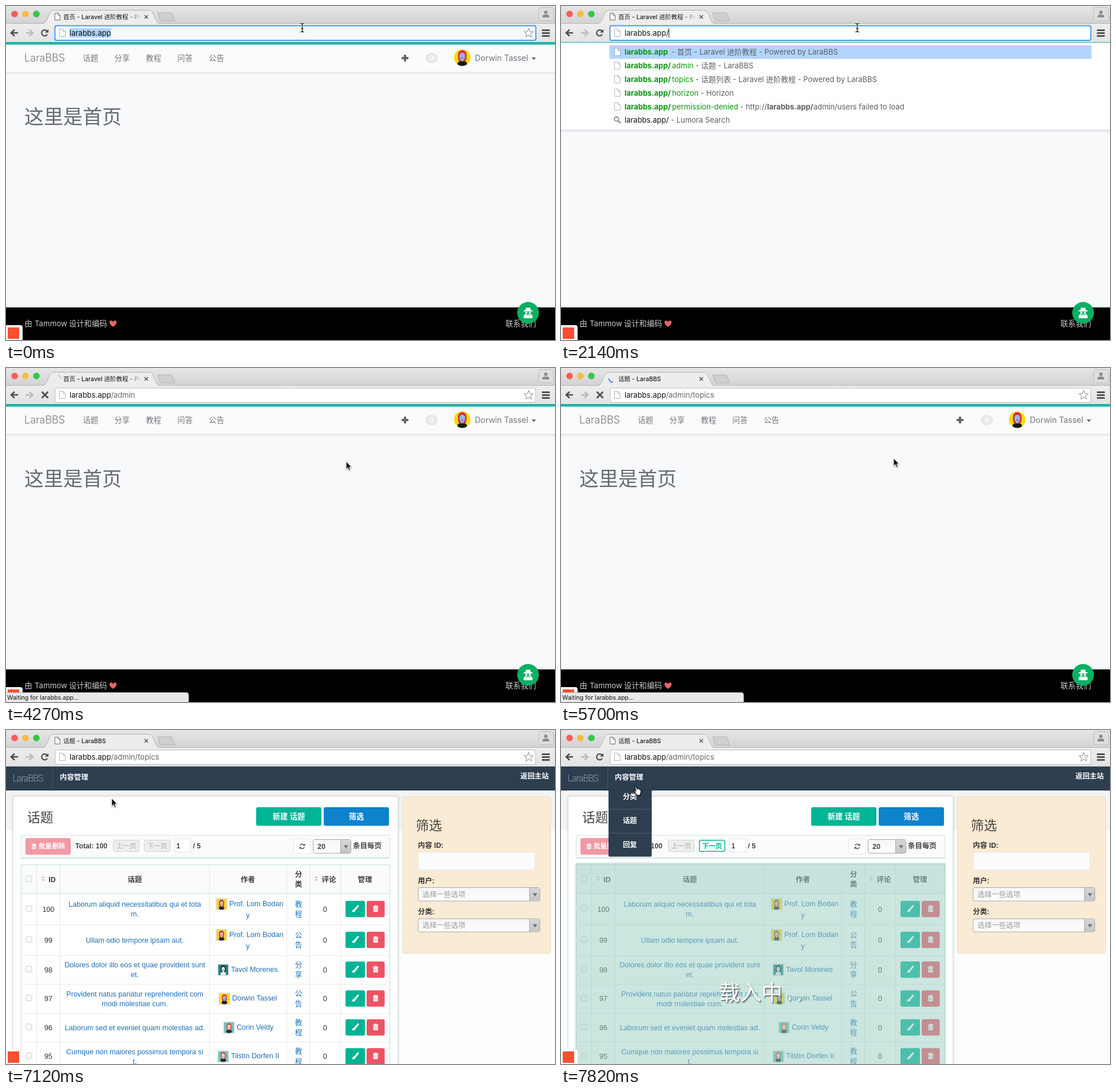
An HTML page with a canvas for the animation above (8 s loop, 959x584 px).

```html
<!DOCTYPE html>
<html lang="zh-CN">
<head>
<meta charset="utf-8">
<title>LaraBBS</title>
<style>
html, body { margin: 0; width: 100%; height: 100%; overflow: hidden; background: #f8f9fb; }
canvas { display: block; }
</style>
</head>
<body>
<canvas id="stage" width="959" height="584"></canvas>
<script>
const c = document.getElementById('stage').getContext('2d');
const LOOP = 8000, STEP = LOOP / 45;
const UI = 'Inter, "Noto Sans CJK SC", "Noto Sans CJK", sans-serif';
const ARIAL = '"Liberation Sans", "Noto Sans CJK SC", "Noto Sans CJK", sans-serif';
const TEAL = '#00b495', NAVY = '#2d3e50', LINK = '#1c6fb8', RED = '#ee5263';

function box(x, y, w, h, fill, r = 0, stroke, lw = 1) {
  c.beginPath();
  const o = stroke ? lw / 2 : 0;
  c.roundRect(x + o, y + o, w - 2 * o, h - 2 * o, r);
  if (fill) { c.fillStyle = fill; c.fill(); }
  if (stroke) { c.strokeStyle = stroke; c.lineWidth = lw; c.stroke(); }
}

function poly(pts, fill, stroke, lw = 1, open) {
  c.beginPath();
  for (let i = 0; i < pts.length; i += 2) c.lineTo(pts[i], pts[i + 1]);
  if (!open) c.closePath();
  if (fill) { c.fillStyle = fill; c.fill(); }
  if (stroke) { c.strokeStyle = stroke; c.lineWidth = lw; c.stroke(); }
}

const line = (x1, y1, x2, y2, color, lw = 1) => poly([x1, y1, x2, y2], null, color, lw, true);

function dot(x, y, r, fill) {
  c.beginPath();
  c.arc(x, y, r, 0, 7);
  c.fillStyle = fill;
  c.fill();
}

function arc(x, y, r, from, to, color, lw) {
  c.beginPath();
  c.arc(x, y, r, from, to);
  c.strokeStyle = color;
  c.lineWidth = lw;
  c.stroke();
}

// Text centred vertically on cy; returns its right edge.
function text(s, x, cy, size, color, { font = UI, weight = 400, align = 'left' } = {}) {
  c.font = `${weight} ${size}px ${font}`;
  c.textAlign = align;
  c.fillStyle = color;
  c.fillText(s, x, cy + size * 0.36);
  return x + c.measureText(s).width;
}

function grad(y1, y2, a, b) {
  const g = c.createLinearGradient(0, y1, 0, y2);
  g.addColorStop(0, a);
  g.addColorStop(1, b);
  return g;
}

function docIcon(x, y, w, h, color) {
  const f = w * 0.4;
  poly([x, y, x + w - f, y, x + w, y + f, x + w, y + h, x, y + h], '#fff', color);
  poly([x + w - f, y, x + w - f, y + f, x + w, y + f], null, color, 1, true);
}

function avatar(x, y, w, h, [bg, hair, face, body]) {
  c.save();
  c.translate(x, y);
  c.scale(w / 20, h / 20);
  box(0, 0, 20, 20, bg);
  box(5, 1.5, 10, 14, hair, 5);
  box(6.8, 4.5, 6.4, 8.5, face, 3);
  box(8.5, 12, 3, 3.5, face);
  box(4.5, 14.5, 11, 6, body, 3);
  box(9, 10, 2, 1, hair);
  c.restore();
}

const LADY = ['#f7dc0a', '#e2263c', '#8fb8e8', '#161616'];
const LADY2 = ['#fbd21b', '#8c3b5e', '#f4b7a0', '#2a2740'];
const MAID = ['#14858a', '#17292f', '#f6ddd2', '#e9eef0'];
const CAPPED = ['#69c3bb', '#e0453b', '#f3d5c5', '#222b33'];

function trash(x, y) {
  box(x - 4, y - 3, 8, 8.5, '#fff', 1);
  box(x - 5, y - 4.5, 10, 1.3, '#fff');
  box(x - 2, y - 6, 4, 1.5, '#fff');
  for (const d of [-2, 0, 2]) line(x + d, y - 1.5, x + d, y + 4, 'rgba(230,90,110,.7)', 0.8);
}

function brush(x, y) {
  c.lineCap = 'round';
  line(x + 5, y - 5, x, y + 1, '#fff', 3);
  c.lineCap = 'butt';
  poly([x - 1, y, x + 1, y + 3, x - 2, y + 6, x - 6, y + 5, x - 4, y + 2], '#fff');
}

function reload(x, y, r, color, lw) {
  arc(x, y, r, 0.5, 5.6, color, lw);
  poly([x + r + 1.5, y - r - 1, x + r + 1.5, y - 0.5, x + 0.5, y - 0.5], color);
}

// Browser frame

const HOME_TITLE = '首页 - Laravel 进阶教程 - Powered by LaraBBS';

function tabStrip(n) {
  box(0, 0, 959, 31, grad(0, 31, '#e6e6e6', '#d2d2d2'));
  [['#fc5b57', 15], ['#fdbb3d', 34], ['#34c648', 53]].forEach(([f, x]) => dot(x, 14, 5.8, f));
  poly([265, 12, 289, 12, 295, 26, 272, 26, 269, 24], '#cfcfcf', '#b2b2b2');
  box(930, 2, 27, 24, '#dedede', 3, '#bdbdbd');
  dot(943, 11, 3, '#8b8b8b');
  box(937, 15, 12, 5, '#8b8b8b', [4, 4, 0, 0]);

  box(0, 31, 959, 33, grad(31, 64, '#ededed', '#e3e3e3'));
  line(0, 30.5, 959, 30.5, '#b4b4b4');
  c.beginPath();
  c.moveTo(65, 31);
  c.bezierCurveTo(74, 29, 74, 7.5, 82, 7.5);
  c.lineTo(251, 7.5);
  c.bezierCurveTo(259, 7.5, 259, 29, 268, 31);
  c.fillStyle = '#ededed';
  c.fill();
  c.strokeStyle = '#b4b4b4';
  c.lineWidth = 1;
  c.stroke();

  if (n >= 17 && n < 32) {
    const a = -1.5 - (n - 17) * 0.9;
    arc(90, 19, 6, a, a + 1.5, '#b9c1cf', 1.6);
  } else if (n === 32 || n === 33) {
    const a = 1.4 + (n - 32) * 1.1;
    arc(90, 18.5, 6.2, a, a + 1.8, '#3c82e0', 2);
  } else docIcon(85.5, 12.5, 9, 12, '#6b6b6b');

  c.save();
  c.beginPath();
  c.rect(98, 8, 138, 22);
  c.clip();
  text(n < 32 ? HOME_TITLE : '话题 - LaraBBS', 100, 19, 10.6, '#1d1d1d', { weight: 500 });
  const fade = c.createLinearGradient(212, 0, 236, 0);
  fade.addColorStop(0, 'rgba(237,237,237,0)');
  fade.addColorStop(1, '#ededed');
  c.fillStyle = fade;
  c.fillRect(212, 10, 24, 18);
  c.restore();
  line(242, 16, 248, 22, '#555', 1.5);
  line(248, 16, 242, 22, '#555', 1.5);
}

function arrowIcon(x, dir, color) {
  line(x - 6 * dir, 47, x + 5 * dir, 47, color, 2.6);
  poly([x, 41.5, x + 6 * dir, 47, x, 52.5], null, color, 2.6, true);
}

function star(x, y) {
  const pts = [];
  for (let i = 0; i < 10; i++) {
    const r = i % 2 ? 3.7 : 8.2, a = i * Math.PI / 5 - Math.PI / 2;
    pts.push(x + r * Math.cos(a), y + r * Math.sin(a));
  }
  poly(pts, '#fff', '#9a9a9a', 1.1);
}

function toolbar(n) {
  const focus = n < 17, loading = n >= 17 && n < 34;
  arrowIcon(15, -1, '#4d4d4d');
  arrowIcon(41, 1, '#bcbcbc');
  if (loading) {
    line(62.5, 41.5, 73.5, 52.5, '#4d4d4d', 2.8);
    line(73.5, 41.5, 62.5, 52.5, '#4d4d4d', 2.8);
  } else reload(67.5, 47, 5.2, '#4d4d4d', 2.3);
  for (const y of [41, 46, 51]) box(936, y, 14, 2.8, '#454545', 1);

  if (focus) box(84.5, 33.5, 842, 27.5, n < 3 ? '#f7f8fb' : '#fff', 3, '#4c9be8', 2);
  else box(85.5, 34.5, 840, 26, '#fff', 2, '#bcbcbc');
  docIcon(93.5, 40.5, 10, 13, '#b5b5b5');
  if (n < 6 || n >= 17) star(913, 47.5);
  address(n);
  line(0, 63.5, 959, 63.5, '#b9b9b9');
}

function address(n) {
  const host = 'larabbs.app', x = 111, size = 13;
  c.font = `${size}px ${UI}`;
  const width = s => c.measureText(s).width;
  if (n >= 17) {
    const end = text(host, x, 47, size, '#111');
    text(n < 32 ? '/admin' : '/admin/topics', end, 47, size, '#666');
    return;
  }
  const typed = n < 10 ? host : host + '/' + 'admin'.slice(0, n < 14 ? 0 : (n - 14) * 2 + 1);
  const full = n < 14 ? typed : host + '/admin';
  const from = n < 3 ? 0 : width(typed), to = width(full);
  if (to - from > 1) box(x + from, 39, to - from, 16, '#add2fb');
  text(full, x, 47, size, '#111');
  if (n >= 3) line(x + from + 0.5, 39, x + from + 0.5, 55, '#111');
}

const HITS = [
  ['larabbs.app', '', 0, '首页 - Laravel 进阶教程 - Powered by LaraBBS', 193],
  ['larabbs.app/', 'admin', 194, '话题 - LaraBBS', 235],
  ['larabbs.app/', 'topics', 194, '话题列表 - Laravel 进阶教程 - Powered by LaraBBS', 235],
  ['larabbs.app/', 'horizon', 194, 'Horizon', 244],
  ['larabbs.app/', 'permission-denied', 194, 'http://', 313],
];

function suggestions(n) {
  const hits = n < 10 ? HITS.slice(0, 1) : n < 14 ? HITS : HITS.slice(1);
  const count = hits.length + (n < 10 ? 0 : 1), h = count * 23.8 + 9.5;
  box(0, 64, 959, h, '#fff');
  box(0, 64 + h, 959, 5, grad(64 + h, 69 + h, '#d9dcdf', 'rgba(235,238,241,.3)'));
  box(84.5, 68.5, 842, 24, '#b2d5fe');
  const grey = '#5d5f63', green = '#0a960f';
  hits.forEach(([bold, rest, rx, desc, dx], i) => {
    const y = 80.7 + i * 23.8;
    docIcon(93.5, y - 7, 10, 13, i ? '#b5b5b5' : '#8fa9c8');
    text(bold, 111, y, 13, green, { weight: 700 });
    if (rest) text(rest, rx, y, 13, green);
    let end = text('- ' + desc, dx, y, 13, grey);
    if (desc === 'http://') {
      end = text('larabbs.app/', end, y, 13, grey, { weight: 700 });
      text('admin/users failed to load', end, y, 13, grey);
    }
  });
  if (n >= 10) {
    const y = 80.7 + hits.length * 23.8;
    arc(97, y - 2, 3.7, 0, 7, '#8a8a8a', 1.8);
    line(99.5, y + 1, 104, y + 5, '#8a8a8a', 2.4);
    text(n < 14 ? 'larabbs.app/' : 'larabbs.app/admin', 111, y, 13, '#111');
    text('- Lumora Search', n < 14 ? 192 : 230, y, 13, grey);
  }
}

// Pages

function homePage() {
  const grey = '#74777a';
  box(0, 64, 959, 520, '#f8f9fb');
  box(0, 67, 959, 48, '#fafbfc');
  box(0, 63, 959, 4.5, '#18b3a7');
  box(0, 115, 959, 5, grad(115, 120, '#e2e4e6', '#f5f6f8'));
  text('LaraBBS', 32, 91, 18, grey, { weight: 300 });
  ['话题', '分享', '教程', '问答', '公告'].forEach((s, i) => text(s, 134.3 + i * 55, 91, 13.4, grey));
  box(691, 89, 12, 4, '#666', 1);
  box(695, 85, 4, 12, '#666', 1);
  box(733, 82, 21.5, 18, '#e7e8e9', 9);
  text('0', 743.7, 91, 11.5, '#fff', { weight: 700, align: 'center' });
  c.save();
  c.beginPath();
  c.arc(797, 90.3, 14.4, 0, 7);
  c.clip();
  avatar(782, 75, 30, 30, LADY);
  c.restore();
  text('Dorwin Tassel', 819, 91, 14, grey);
  poly([918, 90, 926, 90, 922, 94.3], '#666');
  text('这里是首页', 32, 194, 34, '#636b6f', { weight: 300 });

  box(0, 527, 959, 57, '#000');
  const pale = '#c9c9c9';
  text('由', 32.5, 555, 13.3, pale);
  text('Tammow', 50, 555, 13.3, pale);
  text('设计和编码', 110, 555, 13.3, pale);
  c.beginPath();
  c.moveTo(187, 561);
  c.bezierCurveTo(176, 554, 182, 546, 187, 552);
  c.bezierCurveTo(192, 546, 198, 554, 187, 561);
  c.fillStyle = '#e26764';
  c.fill();
  text('联系我们', 926, 555, 13.4, pale, { align: 'right' });
  agentButton();
}

function agentButton() {
  dot(912, 536.5, 19, '#0aaf63');
  poly([907, 533, 908.5, 527, 911, 527.8, 913, 527.8, 915.5, 527, 917, 533], '#fff');
  box(904, 532, 16, 2, '#fff', 1);
  dot(909, 536.3, 2, '#fff');
  dot(915, 536.3, 2, '#fff');
  box(904, 538.5, 16, 7.5, '#fff', [5, 5, 2, 2]);
  poly([909, 538, 915, 538, 912, 546], '#0aaf63');
  poly([911, 539, 913, 539, 913.5, 545, 910.5, 545], '#fff');
}

const ROWS = [
  [100, 313, ['Laborum aliquid necessitatibus qui et tota', 'm.'], 'Prof. Lom Bodan', 'y', 390, 367, LADY2, '教程'],
  [99, 367, ['Ullam odio tempore ipsam aut.'], 'Prof. Lom Bodan', 'y', 390, 367, LADY2, '公告'],
  [98, 419, ['Dolores dolor illo eos et quae provident sunt', 'et.'], 'Tavol Morenes', '', 393, 370, MAID, '分享'],
  [97, 469.5, ['Provident natus pariatur reprehenderit com', 'modi molestiae cum.'], 'Dorwin Tassel', '', 395, 372, LADY, '公告'],
  [96, 520, ['Laborum sed et eveniet quam molestias ad.'], 'Corin Veldy', '', 403, 380, CAPPED, '教程'],
  [95, 570.5, ['Cumque non maiores possimus tempora si', 't.'], 'Tilstin Dorfen II', '', 393, 370, CAPPED, '教程'],
];
const COLS = [53.5, 94.5, 355.5, 490.5, 530.5, 584.5];
const mid = { font: ARIAL, align: 'center' };
const bold = { font: ARIAL, weight: 700 };
const boldMid = { ...mid, weight: 700 };

const checkbox = y => box(34.5, y - 5.5, 11, 11, '#fcfcfc', 2, '#c9c9c9');

function sortIcon(x, y) {
  poly([x - 3, y - 1.5, x + 3, y - 1.5, x, y - 4.5], '#b9bfc4');
  poly([x - 3, y + 1, x + 3, y + 1, x, y + 4], '#b9bfc4');
}

function selectBox(x, y, w, h, label, color, weight) {
  box(x, y, w, h, grad(y, y + h, '#f4f5f7', '#fff'), 3, '#a6a6a6');
  box(x + w - 18, y + 1, 17, h - 2, grad(y, y + h, '#d8d8d8', '#c4c4c4'), [0, 2, 2, 0]);
  line(x + w - 18.5, y, x + w - 18.5, y + h, '#a6a6a6');
  const ty = y + h / 2;
  poly([x + w - 13, ty - 2, x + w - 5, ty - 2, x + w - 9, ty + 4], '#777');
  text(label, x + 8, ty + 0.3, 12.5, color, { font: ARIAL, weight });
}

function pager(x, label, on) {
  box(x, 192, 46, 21, on ? '#fff' : '#eee', 3, on ? TEAL : '#cfcfcf', on ? 1.5 : 1);
  text(label, x + 23, 202.5, 11.6, on ? TEAL : '#c3c3c3', boldMid);
}

function tools(n) {
  box(26, 183.5, 645, 41, '#fafbfb', 0, '#dcdfe0');
  line(26, 223.5, 671, 223.5, '#bcdcd7');
  box(34, 189, 79, 29, '#f299a5', 3);
  c.save();
  c.translate(49, 203.5);
  c.scale(0.85, 0.85);
  trash(0, 0);
  c.restore();
  text('批量删除', 57, 203.3, 11.6, '#fff', bold);
  text('Total: 100', 121, 202.5, 12.2, '#444', bold);
  pager(187, '上一页', n < 37);
  pager(241, '下一页', n < 37 || n >= 42);
  if (n > 35) box(294.5, 189.5, 28.5, 24.5, '#fff', 0, '#dfe2e3');
  else { box(295, 190, 28, 24, '#fff'); line(294.5, 190, 294.5, 214, '#e2e4e5'); }
  text('1', 297.5, 202.5, 12.2, '#444', bold);
  text('/ 5', 326.5, 202.5, 12.2, '#444', bold);
  box(502, 190, 31, 27, '#fff', 2, '#e4e6e7');
  arc(517.5, 203.5, 4, 3.5, 5.7, '#555', 1.5);
  arc(517.5, 203.5, 4, 0.4, 2.6, '#555', 1.5);
  poly([522.5, 198.5, 522.5, 202.5, 518.5, 202.5], '#555');
  poly([512.5, 208.5, 512.5, 204.5, 516.5, 204.5], '#555');
  selectBox(536, 191, 67, 25, '20', '#444', 700);
  text('条目每页', 606, 202, 12.5, '#444', bold);
}

function table() {
  box(26, 235, 645, 360, '#fff');
  box(26, 235, 645, 51, '#fafbfb');
  c.setLineDash([1, 1]);
  for (const x of COLS) line(x, 236, x, 584, '#cfd3d4');
  for (const y of [340.5, 394.5, 444.5, 495.5, 545.5]) line(26, y, 671, y, '#cfd3d4');
  c.setLineDash([]);
  box(26, 235, 645, 360, null, 0, '#c3dfda');
  line(26, 286, 671, 286, '#c9e3df');

  checkbox(260);
  sortIcon(65, 260);
  sortIcon(542, 260);
  [['ID', 80.5, 261], ['话题', 225, 261], ['作者', 422.5, 261], ['分', 511, 252.5], ['类', 511, 269.5],
    ['评论', 564, 261], ['管理', 627, 261]].forEach(([s, x, y]) => text(s, x, y, 12.5, '#3c3c3c', boldMid));

  for (const [id, y, title, name, tail, nx, ax, face, kind] of ROWS) {
    checkbox(y - 1);
    text(id, 74, y, 12.6, '#333', mid);
    const off = title.length > 1 ? -8.5 : 0;
    title.forEach((s, i) => text(s, 225, y + off + i * 17, 12.6, LINK, mid));
    const ny = tail ? y - 9.5 : y - 0.7;
    box(ax - 0.5, ny - 9.5, 20, 21, '#dedede');
    avatar(ax + 1, ny - 8, 17, 18, face);
    text(name, nx, ny, 12.6, LINK, { font: ARIAL });
    if (tail) text(tail, 422.5, ny + 20, 12.6, LINK, mid);
    text(kind[0], 511, y - 9, 12.6, LINK, mid);
    text(kind[1], 511, y + 8.5, 12.6, LINK, mid);
    text('0', 557.3, y, 12.6, '#333', mid);
    box(593, y - 14.2, 34, 28.5, TEAL, 3);
    box(630, y - 14.2, 31.5, 28.5, RED, 3);
    brush(610, y - 0.5);
    trash(645.7, y - 0.5);
  }
}

function filters() {
  box(692, 116, 260, 275, '#faebd4', 4, '#eedcbd');
  text('筛选', 716, 166.5, 22.8, '#444', { font: ARIAL });
  text('内容 ID:', 719.5, 202, 12.4, '#333', bold);
  box(720, 213.5, 204, 31.5, '#fafcfd', 0, '#ecebe6');
  text('用户:', 719.5, 264, 12.4, '#333', bold);
  selectBox(719.5, 275, 213.5, 24.5, '选择一些选项', '#999', 400);
  text('分类:', 719.5, 318, 12.4, '#333', bold);
  selectBox(719.5, 329.5, 213.5, 24, '选择一些选项', '#999', 400);
}

function adminPage(n) {
  box(0, 64, 959, 520, '#fcfdfd');
  if (n >= 37) box(0, 105, 959, 70, '#f3f4f4');
  c.save();
  c.shadowColor = 'rgba(0,0,0,.22)';
  c.shadowBlur = 4;
  box(12.5, 116, 672.5, 480, '#fff', 2);
  c.restore();
  box(12, 115.5, 673, 480, null, 2, n < 37 ? '#d3d6d7' : '#e0e2e3');
  text('话题', 37, 152.5, 22.8, '#444', { font: ARIAL });
  box(437, 135, 114, 32.5, TEAL, 3);
  text('新建 话题', 494, 151.5, 13.2, '#fff', boldMid);
  box(555, 135, 114, 32.5, n < 37 ? '#1076bb' : '#0e82cc', 3);
  text('筛选', 612, 151.5, 13.2, '#fff', boldMid);
  tools(n);
  table();
  filters();
  if (n >= 41) loadingVeil(n);

  box(0, 64, 959, 41.5, NAVY);
  line(0, 105, 959, 105, '#233140');
  c.letterSpacing = '-0.9px';
  text('LaraBBS', 12, 84.5, 16, '#eef1f3', { font: 'Roboto, sans-serif', weight: 200 });
  c.letterSpacing = '0px';
  line(81.5, 68, 81.5, 102, '#465666');
  text('内容管理', 94, 83, 12.4, '#fff', bold);
  text('返回主站', 898.5, 80.3, 12.4, '#fff', bold);
  const bar = [70, 190, 520, 959][n - 34];
  if (bar) box(0, 63, bar, 2.5, '#16b5a0');

  if (n >= 42) {
    box(83, 105, 75.5, 116.5, NAVY, [0, 0, 2, 2]);
    ['分类', '话题', '回复'].forEach((s, i) => {
      text(s, 120.3, 116.5 + i * 42, 12.4, '#fff', boldMid);
      if (i) line(83, 96.5 + i * 42, 158.5, 96.5 + i * 42, '#4b5b6b');
    });
  }
}

function loadingVeil(n) {
  c.save();
  c.globalAlpha = n === 41 ? 0.5 : 1;
  box(25, 232, 647, 360, 'rgba(152,203,191,.5)', 3);
  c.shadowColor = 'rgba(60,60,60,.75)';
  c.shadowBlur = 2;
  c.shadowOffsetX = c.shadowOffsetY = 1.5;
  text('载入中', 276, 460, 37, '#fff', { font: ARIAL });
  for (const x of [397, 415]) box(x, 470, 3.5, 3.5, '#fff');
  c.restore();
}

function cornerBadge() {
  box(0, 558, 29, 26, '#fff', [0, 4, 0, 0]);
  box(3, 562, 20, 20, '#fb4f32');
}

function statusBar() {
  box(-1, 567, 320.5, 20, '#e9e9e9', [0, 4, 0, 0], '#a9a9a9');
  text('Waiting for larabbs.app...', 2, 576, 10.6, '#111');
}

// Pointer

const PATH = [[19, 517, 38], [25, 609, 188], [28, 604, 190], [31, 600, 178], [32, 580.5, 157.5],
  [35, 577, 158], [37, 520, 160], [40, 184, 119], [42, 127, 97], [45, 127, 97]];

function pointerAt(n) {
  if (n <= PATH[0][0]) return PATH[0].slice(1);
  const i = PATH.findIndex(p => p[0] >= n), [a, ax, ay] = PATH[i - 1], [b, bx, by] = PATH[i];
  const k = (n - a) / (b - a);
  return [ax + (bx - ax) * k, ay + (by - ay) * k];
}

function pointer(n) {
  const [x, y] = pointerAt(n);
  c.save();
  c.translate(x, y);
  if (n < 20) {
    for (const [color, lw] of [['rgba(255,255,255,.8)', 2.6], ['#111', 1.2]]) {
      line(0.5, -6, 0.5, 6, color, lw);
      poly([-3, -7.5, -1, -7.3, 0.5, -6, 2, -7.3, 4, -7.5], null, color, lw, true);
      poly([-3, 7.5, -1, 7.3, 0.5, 6, 2, 7.3, 4, 7.5], null, color, lw, true);
      line(-1.5, 1.5, 2.5, 1.5, color, lw);
    }
  } else {
    c.shadowColor = 'rgba(0,0,0,.35)';
    c.shadowBlur = 2;
    c.shadowOffsetY = 1;
    c.lineJoin = 'round';
    if ((n >= 34 && n < 37) || n >= 42)
      poly([2, 1, 4, 1, 6, 6, 8, 5.5, 10, 6.3, 12, 7.5, 13, 10, 12, 14, 11, 17, 5, 17, 3.5, 14, 0, 9.5, 1, 8.5, 3.8, 10], '#fff', '#111', 1.2);
    else
      poly([0.5, 0.5, 0.5, 14, 3.5, 11.2, 5.7, 16, 8, 15, 6, 10.3, 10, 10.2], '#111', '#fff', 1);
  }
  c.restore();
}

function draw(n) {
  c.clearRect(0, 0, 959, 584);
  tabStrip(n);
  toolbar(n);
  n < 34 ? homePage() : adminPage(n);
  if (n >= 6 && n < 17) suggestions(n);
  cornerBadge();
  if (n >= 18 && n < 38) statusBar();
  pointer(n);
}

const start = performance.now();
function tick() {
  const t = (performance.now() - start) % LOOP;
  draw(Math.min(44, Math.floor((t + 4) / STEP)));
  requestAnimationFrame(tick);
}
tick();
</script>
</body>
</html>
```
